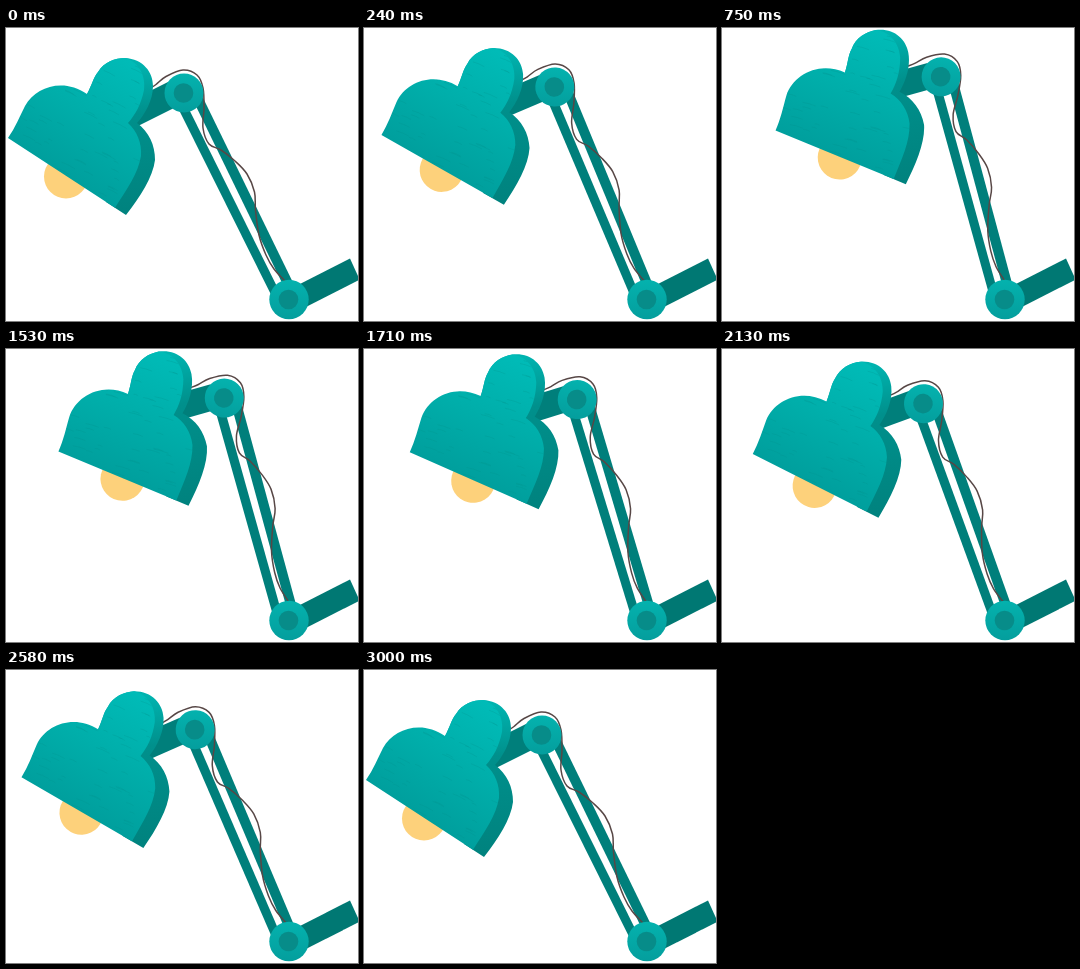
Animation of 352x293 px, one loop 4500 ms. Source, as an HTML page:

```html
<!DOCTYPE html>
<html lang="en">
<head>
<meta charset="utf-8">
<title>Desk lamp</title>
<style>
  html, body { margin: 0; width: 100%; height: 100%; overflow: hidden; background: #fff; }
  svg { display: block; width: 100vw; height: 100vh; }
  .bar { fill: #007f7b; }
  .disc { fill: url(#metal); }
  .hub { fill: #078c89; }
  .wire { fill: none; stroke: #574746; stroke-width: 1.5; }
</style>
</head>
<body>
<svg viewBox="0 0 352 293" preserveAspectRatio="none">
  <defs>
    <linearGradient id="face" gradientUnits="userSpaceOnUse" x1="131" y1="39" x2="60" y2="148">
      <stop offset="0" stop-color="#00bbb7"/>
      <stop offset=".5" stop-color="#00aeaa"/>
      <stop offset="1" stop-color="#009f9d"/>
    </linearGradient>
    <linearGradient id="side" gradientUnits="userSpaceOnUse" x1="130" y1="35" x2="130" y2="187">
      <stop offset="0" stop-color="#00b3af"/>
      <stop offset=".33" stop-color="#00908c"/>
      <stop offset="1" stop-color="#00827e"/>
    </linearGradient>
    <linearGradient id="metal" x1="0" y1="0" x2="0" y2="1">
      <stop offset="0" stop-color="#04b2ae"/>
      <stop offset="1" stop-color="#049e9d"/>
    </linearGradient>
    <clipPath id="shade">
      <path id="front" d="M2 110 C9 100 14 88 19 78 C30 58 58 50 81 66 C86 57 87 50 92 44 C98 34 109 30 119 30 C133 34 140 48 138 62 C135 77 129 87 122 95 C131 103 136 115 135 128 C132 146 121 161 109 179.700 Z"/>
    </clipPath>
  </defs>

  <path fill="#007873" d="M288 259 L344 230.500 L352 248 V252.500 L294 282 Z"/>

  <g id="arm">
    <path class="bar" d="M168 80 L132 98 L120 75 L162 54 Z"/>
    <path class="bar" id="left"/>
    <path class="bar" id="right"/>
    <path class="wire" id="wire"/>
    <circle class="disc" cx="178" cy="65" r="19.500"/>
    <circle class="hub" cx="177.500" cy="65" r="9.800"/>
    <g id="head">
      <circle cx="60" cy="148.500" r="22" fill="#fdd17b"/>
      <path fill="url(#side)" d="M81 66 C86 57 87 50 92 44 C98 34 109 30 119 30 C137 31 147 44 147 58 C147 72 139 86 131 95 C143 104 149 117 149 132 C147 149 134 169 120 187 L100 174 Z"/>
      <use href="#front" fill="url(#face)"/>
      <g id="grain" clip-path="url(#shade)" fill="none" stroke="#008f8a" stroke-width=".8" opacity=".28"></g>
    </g>
  </g>

  <circle class="disc" cx="283" cy="271.500" r="19.700"/>
  <circle class="hub" cx="282.500" cy="271.500" r="9.800"/>
</svg>
<script>
const $ = id => document.getElementById(id);
const base = [283, 271.5], joint = [178, 65], neck = [116, 68];
const SWING = 10.95, NOD = 21.7, STEP = 30, LOOP = 4500;

// Each bar is given by its side offsets at the top and bottom of the arm.
const dx = base[0] - joint[0], dy = base[1] - joint[1], len = Math.hypot(dx, dy);
const beside = ([x, y], d) => [x + d * dy / len, y - d * dx / len];
function bar(id, t0, t1, b0, b1) {
  const pts = [beside(joint, t0), beside(joint, t1), beside(base, b1), beside(base, b0)];
  $(id).setAttribute('d', 'M' + pts.join('L') + 'Z');
}
bar('left', -12, -2.7, -14, -5);
bar('right', 5, 15, 1, 11);

// Smooth curve through every point.
function smooth(pts) {
  const at = i => pts[Math.max(0, Math.min(pts.length - 1, i))];
  const handle = (p, a, b) => p.map((v, k) => v + (b[k] - a[k]) / 6);
  let d = 'M' + pts[0];
  for (let i = 0; i < pts.length - 1; i++) {
    const p = at(i), q = at(i + 1);
    d += 'C' + [handle(p, at(i - 1), q), handle(q, at(i + 2), p), q];
  }
  return d;
}
$('wire').setAttribute('d', smooth([
  [143, 61], [150, 56.5], [160, 48.5], [177, 42], [191, 47], [197, 60], [198, 80], [197, 100], [203, 116],
  [215, 122], [229, 133], [241, 146], [248.5, 164], [249.5, 182], [253, 207], [260, 227], [268, 241], [279, 253]
]));

// Faint brush strokes on the shade.
let seed = 7;
const rnd = () => (seed = seed * 16807 % 2147483647) / 2147483647;
let strokes = '';
for (let i = 0; i < 70; i++) {
  const w = 4 + rnd() * 10;
  strokes += `M${rnd() * 140} ${35 + rnd() * 140}q${w / 2} ${w / 4 - 1} ${w} ${w / 2}`;
}
$('grain').innerHTML = `<path d="${strokes}"/>`;

// 0 = lowered, 1 = raised.
function raise(t) {
  if (t < 750) return t / 750;
  if (t < 1500) return 1;
  return Math.max(0, 1 - (t - 1500) / 1500);
}

function draw(now) {
  const t = Math.floor(now % LOOP / STEP) * STEP, p = raise(t);
  $('arm').setAttribute('transform', `rotate(${SWING * p} ${base})`);
  $('head').setAttribute('transform', `rotate(${-NOD * p} ${neck})`);
}

let start;
function tick(now) {
  start ??= now;
  draw(now - start);
  requestAnimationFrame(tick);
}
draw(0);
requestAnimationFrame(tick);
</script>
</body>
</html>
```
